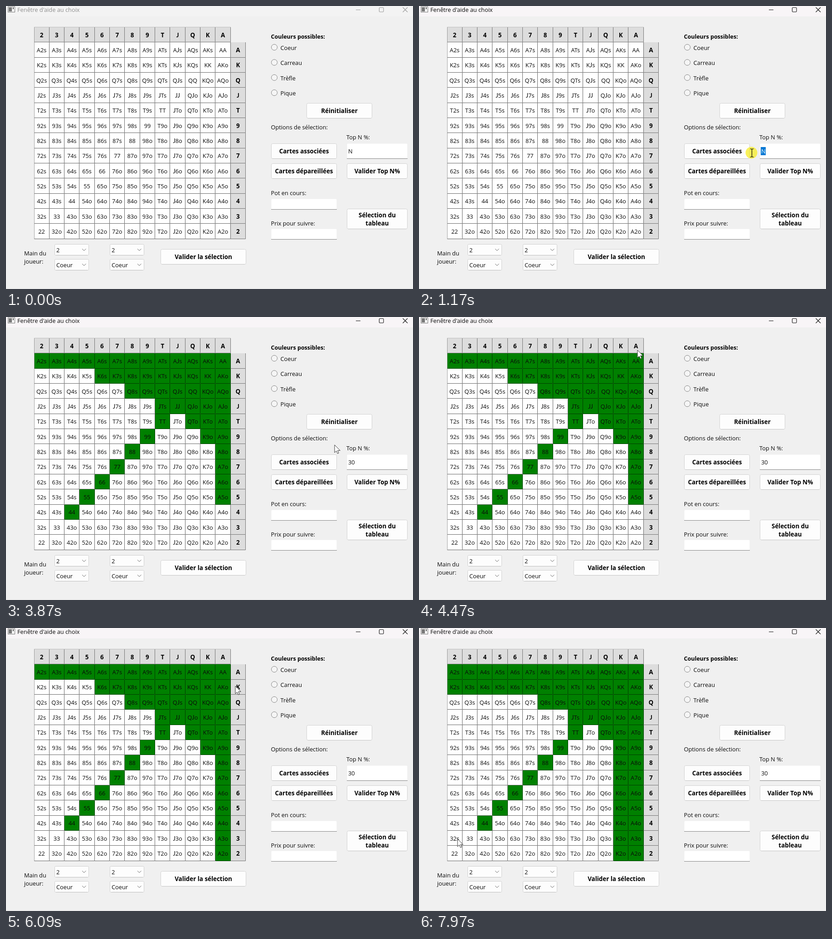
An HTML page for the animation above (8 s loop, 898x624 px).

```html
<!DOCTYPE html>
<html lang="fr">
<head>
<meta charset="utf-8">
<title>Fenêtre d'aide au choix</title>
<style>
html, body { margin: 0; width: 100%; height: 100%; overflow: hidden; background: #f0f0f0; }
svg { display: block; width: 898px; height: 624px; font: 12.8px "Open Sans", "Noto Sans", sans-serif; }
text { fill: #0a0a0a; white-space: pre; }
.b { font-weight: 700; font-size: 13.4px; fill: #000; }
.mid { text-anchor: middle; }
.j { font-family: Lato, sans-serif; }
.btn { fill: #fdfdfd; stroke: #d2d2d2; }
.btn.hover { fill: #f6f6f6; }
.line { fill: none; stroke: #000; }
</style>
</head>
<body>
<svg id="stage" viewBox="0 0 898 624"></svg>
<script>
const LOOP = 8000;
const stage = document.getElementById('stage');

function add(tag, attrs, text, parent = stage) {
  const el = document.createElementNS('http://www.w3.org/2000/svg', tag);
  for (const k in attrs) el.setAttribute(k, attrs[k]);
  if (text) el.textContent = text;
  parent.appendChild(el);
  return el;
}
const rect = (x, y, width, height, fill, more) => add('rect', { x, y, width, height, fill, ...more });
const path = (d, stroke, more) => add('path', { d, fill: 'none', stroke, ...more });
const show = (el, on) => { el.style.display = on ? '' : 'none'; };

// y is the middle of the capitals; J comes from a font where it stays on the baseline
function label(x, y, s, cls = '', more) {
  const el = add('text', { x, y: y + 4.7, class: cls, ...more });
  for (const part of s.split(/(J+)/))
    if (part) add('tspan', part[0] === 'J' ? { class: 'j' } : {}, part, el);
  return el;
}

// Title bar
rect(0, 0, 898, 624, '#f0f0f0');
const bar = rect(0, 0, 898, 23, '#f3f3f3');
rect(0, 623, 898, 1, '#e2e2e2');
rect(4.5, 1.5, 15, 12, '#f8f8f8', { stroke: '#777' });
rect(6, 3, 7, 9, '#777');
rect(15, 3, 2, 4, '#555');
const title = label(25, 8, "Fenêtre d'aide au choix");
const controls = path('M772 8.5H782 M875.5 3L886 13.5M886 3L875.5 13.5 M825 3.5h6.5q1.5 0 1.5 1.5v6.5q0 1.5 -1.5 1.5h-6.5q-1.5 0 -1.5 -1.5v-6.5q0 -1.5 1.5 -1.5z', '#999', { 'stroke-width': 1.1 });

// Table of hands, ruled on whole pixels
const RANKS = 'AKQJT98765432';
const S = 100 / 3;
const colX = i => Math.floor(61.95 + i * S);
const rowY = i => Math.floor(79.95 + i * S);
const cells = [];

function cell(col, row, fill, edge, text, cls) {
  const x = colX(col) + 1, y = rowY(row) + 1, r = colX(col + 1), b = rowY(row + 1);
  const box = rect(x, y, r - x, b - y, fill);
  const rim = path(`M${x} ${b + 0.5}H${r + 0.5}V${y}`, edge);
  label(61.95 + (col + 0.5) * S, 97.4 + row * S, text, 'mid ' + cls);
  return { box, rim };
}

const heads = {};
for (let i = 0; i < 13; i++) {
  heads['col' + i] = cell(i, -1, '#dddddd', '#747474', RANKS[12 - i], 'b');
  heads['row' + i] = cell(13, i, '#dddddd', '#747474', RANKS[i], 'b');
}
for (let r = 0; r < 13; r++) for (let c = 0; c < 13; c++) {
  const k = 12 - c;
  const name = r === k ? RANKS[r] + RANKS[r]
    : r < k ? RANKS[r] + RANKS[k] + 's' : RANKS[k] + RANKS[r] + 'o';
  cells.push({ r, k, ...cell(c, r, '#ffffff', '#666666', name, '') });
}
path('M62.5 47V514', '#8c8c8c', { 'stroke-width': 0.8 });
path('M62 46.5H496', '#b4b4b4', { 'stroke-width': 0.8 });

// Top 30 %: pairs 44+, suited from a limit per row, offsuit down to a limit per column
const SUITED = [12, 8, 6, 4], OFFSUIT = [9, 5, 4];
const inTop = (r, k) => r === k ? r <= 10 : r < k ? k <= SUITED[r] : r <= OFFSUIT[k];

function isGreen(r, k, t) {
  return t >= 3430 && inTop(r, k)
    || t >= 4730 && k === 0
    || t >= 6390 && r === 1
    || t >= 7530 && k === 1;
}

// Form on the right
label(584.5, 67.5, 'Couleurs possibles:', 'b', { style: 'font-size:12.5px' });
['Coeur', 'Carreau', 'Trèfle', 'Pique'].forEach((s, i) => {
  const y = 91 + i * 33.4;
  add('circle', { cx: 592, cy: y, r: 6.5, fill: '#f5f5f5', stroke: '#858585' });
  label(605.5, y + 1, s);
});
label(584.5, 267.5, 'Options de sélection:');
label(751, 289.5, 'Top N %:');
label(584.5, 412, 'Pot en cours:');
label(584.5, 479, 'Prix pour suivre:');
label(40, 545.5, 'Main du');
label(40, 563.5, 'joueur:');

function button(x, y, w, h, ...lines) {
  const el = add('rect', { x: x + 0.5, y: y + 0.5, width: w - 1, height: h - 1, rx: 3, class: 'btn' });
  path(`M${x + 3} ${y + h - 0.5}H${x + w - 3}`, '#c4c4c4');
  lines.forEach((s, i) =>
    label(x + w / 2, y + h / 2 + 0.5 + (i - (lines.length - 1) / 2) * 18, s, 'b mid'));
  return { el, x, y, w, h };
}
const buttons = [
  button(663, 214, 145, 34, 'Réinitialiser'),
  button(585, 303, 145, 34, 'Cartes associées'),
  button(585, 347, 145, 34, 'Cartes dépareillées'),
  button(752, 347, 134, 34, 'Valider Top N%'),
  button(752, 447, 134, 45, 'Sélection du', 'tableau'),
  button(341, 536, 189, 34, 'Valider la sélection')
];

function field(x, y, w, h) {
  rect(x, y, w, h, '#ffffff', { rx: 2, stroke: '#ebebeb', 'stroke-width': 0.8 });
  return rect(x, y + h - 1, w, 1, '#868686');
}
const underline = field(752, 303, 134, 34);
field(585, 425, 145, 24);
field(585, 491, 145, 24);

for (const x of [107, 229]) for (const [y, s] of [[525, '2'], [558, 'Coeur']]) {
  rect(x + 0.5, y + 0.5, 75, 24, '#fdfdfd', { rx: 2, stroke: '#d0d0d0' });
  path(`M${x + 3} ${y + 24.5}H${x + 73}`, '#bdbdbd');
  label(x + 4, y + 13, s);
  path(`M${x + 61} ${y + 10.5}l4.2 4l4.2 -4`, '#666');
}

const mark = rect(754, 311, 11, 18, '#0078d4');
const value = label(755, 320.5, 'N');
const caret = rect(754.5, 311, 1, 18, '#000');

// Pointer
const halo = add('circle', { cx: -1, r: 13, fill: '#f8ee32', opacity: 0.8 });
const arrow = add('path', {
  d: 'M0 0V17L3.9 13.4L6.5 19.2L9.2 18L6.7 12.4H12.2Z',
  fill: '#fff', stroke: '#222', 'stroke-width': 0.9
});
const beam = add('path', {
  d: 'M-4 -8.5H-1.5L0 -7.5L1.5 -8.5H4M0 -7.5V8.5M-4 9.5H-1.5L0 8.5L1.5 9.5H4',
  class: 'line', 'stroke-width': 1.2
});

// time, x, y
const TRACK = [
  [30, 866, 626], [420, 835, 390], [820, 768, 323], [900, 768, 323], [1170, 734.5, 323.5],
  [1330, 734.5, 323.5], [1500, 738, 325], [2770, 738, 325], [2920, 746, 334], [3070, 750, 337],
  [3280, 776, 359], [3500, 776, 359], [3870, 725, 282], [4470, 482, 73], [5130, 482, 73],
  [5460, 499, 92], [5590, 499, 92], [5830, 504, 128], [6060, 504, 128], [6090, 506, 128],
  [6160, 510, 129], [6640, 510, 129], [6760, 507, 139], [7190, 440, 63], [7600, 440, 63],
  [7970, 85, 465]
];
// press, release, header pressed
const CLICKS = [
  [850, 1300], [3350, 3500], [4670, 4850, 'col12'], [5490, 5590, 'row0'],
  [6330, 6450, 'row1'], [7470, 7590, 'col11']
];

function pointer(t) {
  const i = TRACK.findIndex(p => p[0] > t);
  if (i < 0) return TRACK[TRACK.length - 1].slice(1);
  if (i === 0) return TRACK[0].slice(1);
  const [a, b] = [TRACK[i - 1], TRACK[i]];
  let u = (t - a[0]) / (b[0] - a[0]);
  u = u * u * (3 - 2 * u);
  return [a[1] + (b[1] - a[1]) * u, a[2] + (b[2] - a[2]) * u];
}

function draw(t) {
  const [x, y] = pointer(t);
  const active = t >= 850;
  bar.setAttribute('fill', active ? '#f8f5f7' : '#f3f3f3');
  title.style.fill = active ? '#0a0a0a' : '#8f8f8f';
  controls.setAttribute('stroke', t >= 810 ? '#111' : '#999');

  for (const c of cells) {
    const on = isGreen(c.r, c.k, t);
    c.box.setAttribute('fill', on ? '#008000' : '#ffffff');
    c.rim.setAttribute('stroke', on ? '#003c00' : '#666666');
  }

  const press = CLICKS.find(c => t >= c[0] && t < c[1]);
  for (const id in heads)
    heads[id].box.setAttribute('fill', press && press[2] === id ? '#d2d2d2' : '#dddddd');

  const visible = t >= 30 && (t < 1530 || t >= 2390);
  for (const b of buttons)
    b.el.classList.toggle('hover', visible && x > b.x && x < b.x + b.w && y > b.y && y < b.y + b.h);

  // Percentage field
  const selected = t >= 1010 && t < 1420;
  value.textContent = t < 1420 ? 'N' : t < 2030 ? '' : t < 2130 ? '3' : '30';
  value.style.fill = selected ? '#fff' : '#0a0a0a';
  show(mark, selected);
  const focus = t >= 1330 && t < 3360;
  underline.setAttribute('fill', focus ? '#0067c0' : '#868686');
  underline.setAttribute('y', focus ? 335.5 : 336);
  underline.setAttribute('height', focus ? 1.5 : 1);
  show(caret, t >= 1420 && t < 1860 || t >= 2030 && t < 2770);
  caret.setAttribute('x', t < 2030 ? 754.5 : t < 2130 ? 762.5 : 769.8);

  const inField = x > 752 && x < 886 && y > 303 && y < 337;
  const text = t < 1330 && (inField || t >= 850);
  const at = `translate(${x} ${y})`;
  for (const el of [arrow, beam, halo]) el.setAttribute('transform', at);
  show(arrow, visible && !text);
  show(beam, visible && text);
  show(halo, !!press);
}

const start = performance.now();
function tick() {
  draw((performance.now() - start) % LOOP);
  requestAnimationFrame(tick);
}
tick();
</script>
</body>
</html>
```
